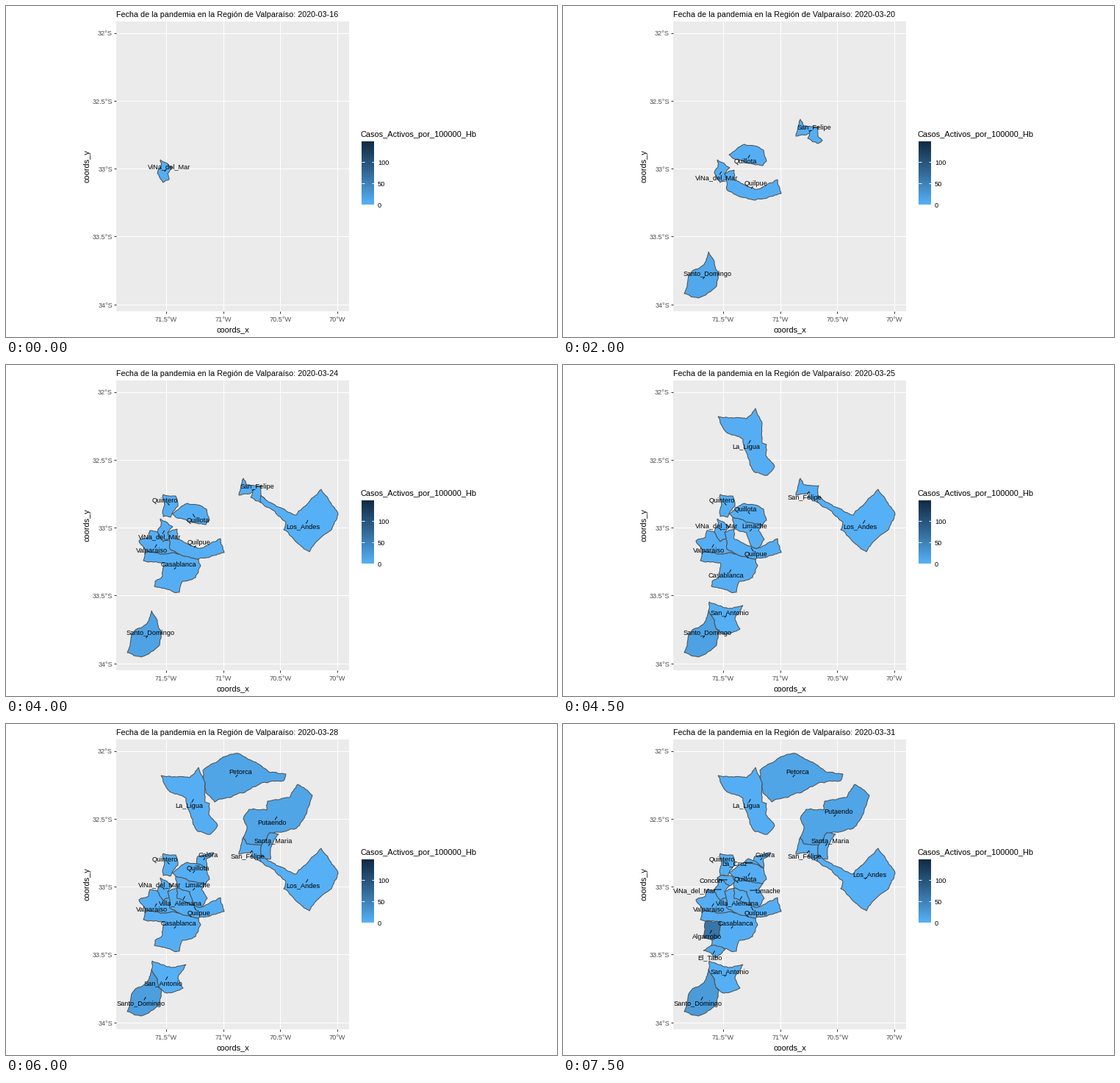
A matplotlib script for the animation above (8000 ms loop, 750 by 450 pixels).

```python
import math
import random

import matplotlib.pyplot as plt
import numpy as np
from matplotlib.animation import FuncAnimation
from matplotlib.colors import LinearSegmentedColormap
from matplotlib.patches import Polygon, Rectangle

plt.rcParams["font.family"] = "Liberation Sans"

W, H, DPI = 750, 450, 100
DAYS, STEP_MS = 16, 500
TOP_VALUE = 146
SCALE = LinearSegmentedColormap.from_list("cases", ["#56B1F7", "#326A98", "#132B43"])

fig = plt.figure(figsize=(W / DPI, H / DPI), dpi=DPI, facecolor="white")
ax = fig.add_axes([0, 0, 1, 1])
ax.axis("off")


def text(x, y, label, px, color="black", **kw):
    kw.setdefault("va", "baseline")
    return ax.text(x, y, label, fontsize=px * 72 / DPI, color=color, **kw)


def line(xs, ys, color, px=1.0, z=1, snap=True):
    return ax.plot(xs, ys, color=color, lw=px * 72 / DPI, zorder=z,
                   snap=snap, solid_capstyle="butt")[0]


def degrees(value, side):
    return f"{value:g}°{side}"


def draw_panel():
    ax.add_patch(Rectangle((150, 21), 317, 394, fc="#EBEBEB", lw=0, zorder=0))
    for i in range(4):
        x = 218 + 77.6 * i
        line([x, x], [21, 415], "white")
        line([x, x], [415, 418], "#333333")
        text(x, 429, degrees(71.5 - i / 2, "W"), 9.2, "#4D4D4D", ha="center")
    for i in range(5):
        y = 36.5 + 92.3 * i
        line([150, 467], [y, y], "white")
        line([147, 150], [y, y], "#333333")
        text(145, y + 4, degrees(32 + i / 2, "S"), 9.2, "#4D4D4D", ha="right")
    text(308.5, 443, "coords_x", 11, ha="center")
    text(110, 218, "coords_y", 11, ha="center", va="center", rotation=90)


def draw_legend():
    text(482.5, 178, "Casos_Activos_por_100000_Hb", 11)
    ax.imshow(np.linspace(1, 0, 86)[:, None], cmap=SCALE, aspect="auto",
              extent=(484, 501, 270, 184), vmin=0, vmax=1)
    for value in (0, 50, 100):
        y = 270 - value * 0.585
        line([484, 487.5], [y, y], "white", z=2)
        line([497.5, 501], [y, y], "white", z=2)
        text(506, y + 4.5, str(value), 9.2)


def fractal(p, q, rng):
    """Points from p up to q, bent by midpoint displacement."""
    length = math.dist(p, q)
    if length < 4:
        return [p]
    bend = rng.uniform(-1, 1) * min(0.12, 1.3 / length)
    mid = ((p[0] + q[0]) / 2 + bend * (p[1] - q[1]),
           (p[1] + q[1]) / 2 + bend * (q[0] - p[0]))
    return fractal(p, mid, rng) + fractal(mid, q, rng)


def border(a, b):
    """Ragged edge, the same for both neighbours that share it."""
    p, q = sorted((a, b))
    pts = fractal(p, q, random.Random(f"{p}{q}")) + [q]
    return pts[:-1] if a == p else pts[:0:-1]


def centroid(pts):
    x, y = np.array(pts, float).T
    x2, y2 = np.roll(x, -1), np.roll(y, -1)
    cross = x * y2 - x2 * y
    return ((x + x2) @ cross / cross.sum() / 3,
            (y + y2) @ cross / cross.sum() / 3)


class Commune:
    def __init__(self, name, sides, outline, cases=3, growth=0):
        self.sides, self.first = sides, min(sides)
        self.cases, self.growth = cases, growth
        self.half = 2.35 * len(name)
        self.anchor = centroid(outline)
        pts = []
        for a, b in zip(outline, outline[1:] + outline[:1]):
            pts += border(a, b)
        self.shape = ax.add_patch(Polygon(pts, ec="#4D4D4D", lw=0.72, zorder=3))
        self.leader = line([], [], "black", 0.9, 4, snap=False)
        self.label = text(0, 0, name, 9.2, ha="center", zorder=5)

    def label_spot(self, side):
        """Labels sit diagonally off the centre, or wholly beside it."""
        x, y = self.anchor
        dx = 6.5 if len(side) == 2 else self.half + 8
        dy = {"N": -7, "S": 8.5}.get(side[0], 1)
        return x + (dx if side[-1] == "E" else -dx), y + dy

    def show(self, day):
        visible = day >= self.first
        for art in (self.shape, self.leader, self.label):
            art.set_visible(visible)
        if not visible:
            return
        cases = self.cases + self.growth * (day - self.first)
        self.shape.set_facecolor(SCALE(cases / TOP_VALUE))
        x, y = self.label_spot(self.sides[max(d for d in self.sides if d <= day)])
        self.label.set_position((x, y + 3))
        cx, cy = self.anchor
        end_x = min(max(cx, x - self.half), x + self.half)
        end_y = min(max(cy, y - 4), y + 4)
        end_x += max(-3, min(3, 0.4 * (x - end_x)))
        self.leader.set_data([cx, end_x], [cy, end_y])


draw_panel()
draw_legend()

# Each commune: name, label side from a given day on, corner points
communes = [
    Commune("Casablanca", {7: "NE", 9: "SW", 11: "NE"}, [
        (190, 252), (187, 266), (214, 269), (213, 287), (203, 294), (202, 301),
        (236, 309), (240, 294), (258, 289), (265, 273), (262, 264), (236, 257),
        (210, 257)]),
    Commune("Valparaiso", {5: "SW"}, [
        (181, 239), (194, 234), (196, 225), (206, 227), (214, 240), (222, 236),
        (223, 250), (236, 257), (210, 257), (190, 252)]),
    Commune("ViNa_del_Mar", {0: "NE", 1: "NW", 3: "SW", 9: "NW", 15: "W"}, [
        (210, 209), (227, 220), (220, 228), (222, 236), (214, 240), (206, 227),
        (211, 219)]),
    Commune("Quilpue", {4: "NE", 6: "SW", 8: "NE", 9: "SE"}, [
        (220, 228), (233, 223), (233, 237), (257, 247), (265, 249), (292, 236),
        (297, 255), (262, 264), (236, 257), (223, 250), (222, 236)]),
    Commune("Limache", {9: "NE", 15: "E"}, [
        (231, 207), (259, 215), (272, 217), (266, 225), (274, 237), (265, 249),
        (257, 247), (250, 228), (233, 223)]),
    Commune("Villa_Alemana", {10: "SW"}, [
        (233, 223), (250, 228), (257, 247), (233, 237)]),
    Commune("Quillota", {2: "NE", 3: "SW", 5: "NW", 6: "NE", 8: "SE", 9: "NW",
                         12: "NE", 14: "SW"}, [
        (226, 202), (247, 188), (260, 190), (273, 196), (277, 211), (272, 217),
        (259, 215), (231, 207)]),
    Commune("Quintero", {7: "NW"}, [
        (214, 176), (231, 178), (234, 192), (226, 202), (224, 207), (214, 206),
        (214, 196)]),
    Commune("Concon", {15: "W"}, [
        (213, 207), (231, 207), (234, 214), (227, 220), (210, 209)]),
    Commune("Calera", {10: "NE"}, [
        (261, 180), (283, 175), (273, 183), (273, 196), (260, 190)]),
    Commune("La_Cruz", {14: "W"}, [
        (247, 188), (252, 183), (264, 188), (273, 196), (260, 190)]),
    Commune("San_Felipe", {4: "NE", 9: "SW"}, [
        (323, 154), (328, 163), (348, 164), (347, 177), (353, 183), (347, 187),
        (333, 180), (336, 173), (317, 177)]),
    Commune("Los_Andes", {8: "SW", 13: "NE"}, [
        (347, 177), (353, 183), (395, 204), (429, 169), (452, 203), (443, 224),
        (420, 243), (413, 254), (399, 244), (378, 224), (381, 214), (366, 199),
        (347, 187)], cases=1),
    Commune("Putaendo", {10: "SW", 14: "NE"}, [
        (397, 82), (417, 97), (409, 122), (395, 142), (367, 147), (359, 148),
        (348, 164), (328, 163), (323, 154), (328, 139), (323, 129), (331, 116),
        (355, 117), (356, 105), (386, 100)], cases=12),
    Commune("Santa_Maria", {12: "NE"}, [
        (348, 164), (359, 148), (371, 150), (362, 164), (360, 184), (353, 183),
        (347, 177)], cases=7),
    Commune("La_Ligua", {9: "SW"}, [
        (211, 70), (226, 72), (250, 73), (262, 59), (271, 79), (271, 106),
        (277, 108), (276, 123), (288, 138), (278, 150), (261, 146), (247, 113),
        (245, 101), (221, 90)]),
    Commune("Petorca", {11: "NE"}, [
        (268, 63), (291, 48), (312, 40), (340, 52), (360, 66), (381, 68),
        (378, 77), (348, 80), (325, 93), (284, 106), (272, 94), (271, 79)],
        cases=12),
    Commune("Algarrobo", {13: "SW"}, [
        (194, 268), (214, 269), (213, 287), (203, 294), (191, 290)],
        cases=50, growth=6),
    Commune("El_Tabo", {14: "SW"}, [
        (191, 308), (202, 301), (221, 306), (209, 318), (202, 312)], cases=8),
    Commune("San_Antonio", {9: "NE", 12: "SW", 14: "NE"}, [
        (199, 322), (230, 331), (245, 327), (234, 346), (241, 359), (219, 366),
        (208, 358), (206, 347), (198, 334)], cases=2),
    Commune("Santo_Domingo", {4: "NE", 7: "SW", 8: "NE", 10: "SW", 11: "NE",
                              12: "SW"}, [
        (198, 334), (206, 347), (208, 358), (212, 362), (209, 381), (184, 397),
        (165, 391), (173, 364), (190, 353)], cases=10, growth=1.2),
]

title = text(150, 15, "", 10.75)
ax.set_xlim(0, W)
ax.set_ylim(H, 0)


def update(day):
    title.set_text(f"Fecha de la pandemia en la Región de Valparaíso: 2020-03-{16 + day}")
    for c in communes:
        c.show(day)
    return []


anim = FuncAnimation(fig, update, frames=DAYS, interval=STEP_MS,
                     init_func=lambda: update(0), repeat=True, repeat_delay=0)
plt.show()
```
